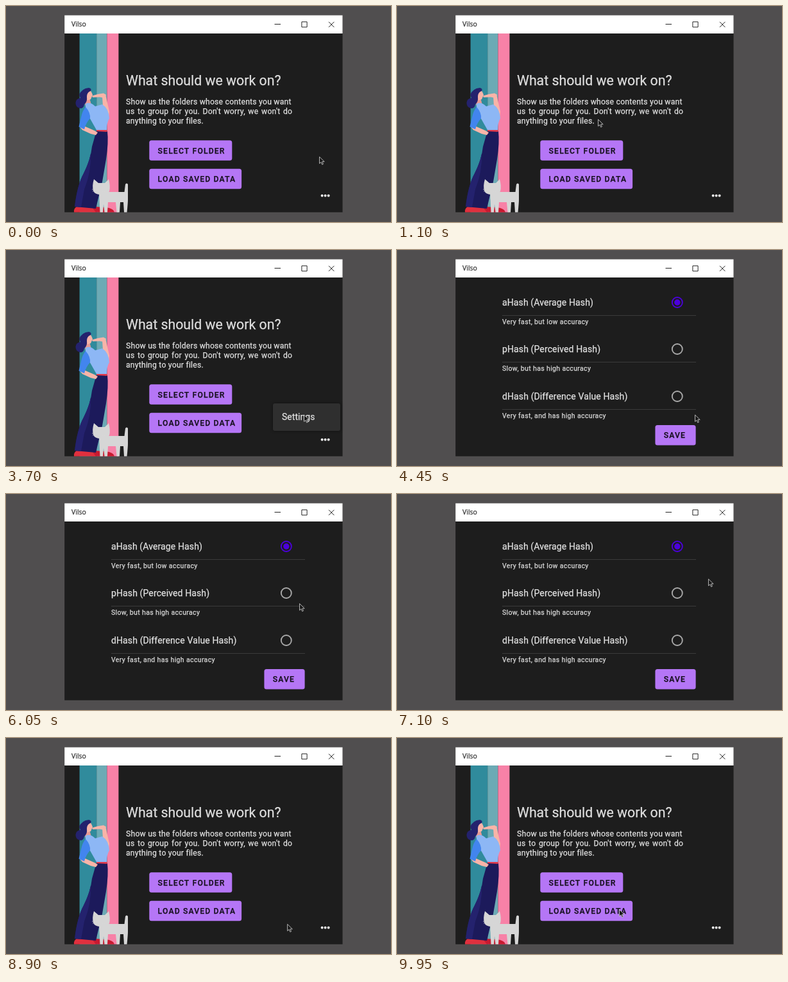
These frames come from a looping animation (600 by 338 pixels, 10000 ms). An HTML page with a canvas:

```html
<!DOCTYPE html>
<html lang="en">
<head>
<meta charset="utf-8">
<title>Folder grouping app</title>
<style>
  html, body { margin: 0; width: 100%; height: 100%; overflow: hidden; background: #504e4f; }
  canvas { display: block; width: 600px; height: 338px; }
</style>
</head>
<body>
<canvas id="stage" width="600" height="338"></canvas>
<script>
const ctx = document.getElementById('stage').getContext('2d');
const LOOP = 10000, STEP = 50;
const SANS = 'Roboto, sans-serif';
const PURPLE = '#b576f6', DARK = '#1d1d1d', SKIN = '#f8b4a8', CAT = '#d6d6d6';

// Pointer path: time, x, y
const PATH = [
  [0, 488, 235.5], [550, 403, 189], [650, 403, 189], [1100, 313, 177],
  [1900, 313, 177], [2700, 503, 292], [3450, 503, 292], [3600, 470, 266],
  [3650, 460, 256], [3700, 464, 257.5], [4450, 464, 257.5], [4650, 464, 267],
  [5150, 464, 267], [5300, 453, 215], [5400, 463, 177], [6000, 463, 177],
  [6050, 457, 171], [6500, 430, 77], [7050, 484, 126], [7250, 490, 168],
  [7600, 443, 289], [7700, 445, 291], [8850, 445, 291], [9150, 352, 289],
  [9850, 352, 289], [9950, 346, 268], [LOOP, 346, 268]
];

function rect(x, y, w, h, color, r = 0) {
  ctx.fillStyle = color;
  ctx.beginPath();
  ctx.roundRect(x, y, w, h, r);
  ctx.fill();
}

function shape(d, fill, stroke, width = 1) {
  const p = new Path2D(d);
  if (fill) { ctx.fillStyle = fill; ctx.fill(p); }
  if (stroke) { ctx.strokeStyle = stroke; ctx.lineWidth = width; ctx.stroke(p); }
}

function disc(x, y, r, color) {
  ctx.fillStyle = color;
  ctx.beginPath();
  ctx.arc(x, y, r, 0, Math.PI * 2);
  ctx.fill();
}

function ring(x, y, r, color, width) {
  ctx.strokeStyle = color;
  ctx.lineWidth = width;
  ctx.beginPath();
  ctx.arc(x, y, r, 0, Math.PI * 2);
  ctx.stroke();
}

// Text with a hairline outline for a slightly heavier weight
function text(str, x, y, font, color, spacing = 0, words = 0) {
  ctx.font = font;
  ctx.letterSpacing = spacing + 'px';
  ctx.wordSpacing = words + 'px';
  ctx.fillStyle = ctx.strokeStyle = color;
  ctx.lineWidth = .25;
  ctx.fillText(str, x, y);
  ctx.strokeText(str, x, y);
}

function button(label, x, y, w, h) {
  rect(x, y, w, h, PURPLE, 3.5);
  text(label, x + 13.3, y + 20.3, '500 12.2px ' + SANS, '#17101f', 1.14);
}

function frame() {
  rect(0, 0, 600, 338, '#504e4f');
  rect(91.2, 14.4, 433.3, 308.4, DARK);
  rect(91.2, 14.4, 433.3, 28.5, '#fff');
  text('Vilso', 102, 32, '10.5px "Open Sans", sans-serif', '#333');
  shape('M418.5 28.5H428', null, '#222');
  shape('M460.9 24.8h8.2v8.2h-8.2z', null, '#222');
  shape('M503 24.8l8.4 8.4M511.4 24.8l-8.4 8.4', null, '#222');
}

function woman() {
  // shoes and trousers
  shape('M136 314L156 315Q168 317 169 322.8H134Z', '#c81a30');
  shape('M106 322.8Q105 316 112 313L134 315L140 322.8Z', '#e0303e');
  shape('M141 195L158 196Q160 213 156 240L150 275L140 317L107 314Q111 280 121 262Q132 240 134 220Z', '#1c1a5b');
  shape('M121 262Q129 246 132 231Q133 260 122 287L117 315L107 314Q111 280 121 262Z', '#24226e');
  shape('M141 193L157.5 194V197L141 196Z', '#e0384a');
  // arm on hip, seen behind the open elbow
  shape('M114 188L122 188L138 195L143 198L140 202L132 200L119 194Z', SKIN);
  // raised forearm and hand
  shape('M150 141L155 138L161 165L160 176L152 174Z', SKIN);
  shape('M134 140.5L143 138L152 136.5L156 139L153 144L146 142.5L135 143Z', SKIN);
  // neck and face
  shape('M121 144L131 147L133 155L124 157Z', '#e99a94');
  shape('M123 136L131 131Q133 134 135 139L132 146Q129 148 124 147Z', SKIN);
  // hair
  shape('M114 139Q118 129 129 128Q134 129 132 133Q126 135 126 142Q127 150 122 154Q121 161 115 160Q108 158 108.5 151Q109 145 116 144Z', '#24226e');
  // shirt and sleeve, with a gap between arm and waist
  shape('M124 153Q131 149 139 157L150 154Q160 160 161 176Q157 182 157 194H141L132 178L124 165Z', '#8db7f5');
  shape('M124 158Q119 164 117 174L113.5 189L122 193Q125 182 131 176Q132 167 124 158Z', '#4285ee');
}

function cat() {
  shape('M137 271L144 277H154L160 271Q163 282 161 290Q158 295 148 295Q138 295 136 289Q134 281 137 271Z', CAT);
  shape('M145 292Q150 290 158 291H184.5L186 279Q188 276 190 279V303Q190 308 188.5 322.8H184L183 307H178L177 322.8H172.5L171 307H159L158 322.8H153.5L152 310L151 322.8H146.5Z', CAT);
  shape('M134 287H139M135 290L140 289', null, CAT, .7);
}

function home() {
  rect(114.6, 42.9, 26.6, 279.9, '#308b9c');
  rect(141.2, 42.9, 16.2, 279.9, '#6caab5');
  rect(157.4, 42.9, 18, 279.9, '#f781a7');
  woman();
  cat();
  text('What should we work on?', 187, 124, '21.3px ' + SANS, '#dedede');
  const body = '12.2px ' + SANS;
  text('Show us the folders whose contents you want', 187, 153.5, body, '#e2e2e2', .22);
  text("us to group for you. Don't worry, we won't do", 187, 168.6, body, '#e2e2e2', .22, 1.35);
  text('anything to your files.', 187, 183.7, body, '#e2e2e2', .22);
  button('SELECT FOLDER', 223.3, 210.3, 129, 31.5);
  button('LOAD SAVED DATA', 223.3, 254.8, 143.8, 31.5);
  for (let i = 0; i < 3; i++) disc(492.6 + i * 5, 296.8, 2, '#f0f0f0');
}

function menu() {
  ctx.save();
  ctx.shadowColor = 'rgba(0,0,0,.5)';
  ctx.shadowBlur = 4;
  rect(416, 240, 105, 43, '#2f2f2f', 3);
  ctx.restore();
  text('Settings', 430, 266, '13.9px ' + SANS, '#e2e2e2', .1);
}

function option(title, note, y, on) {
  text(title, 164, y + 5, '14px ' + SANS, '#e2e2e2', .12);
  rect(164, y + 20, 302, 1, '#3b3b3b');
  text(note, 164, y + 34, '10.5px ' + SANS, '#dcdcdc', .36);
  const color = on ? '#4b00dc' : '#a8a8a8';
  ring(436.8, y, 8, color, 1.9);
  if (on) disc(436.8, y, 4.7, color);
}

function settings() {
  option('aHash (Average Hash)', 'Very fast, but low accuracy', 82, true);
  option('pHash (Perceived Hash)', 'Slow, but has high accuracy', 155, false);
  option('dHash (Difference Value Hash)', 'Very fast, and has high accuracy', 229, false);
  button('SAVE', 402.4, 274, 63.2, 31.6);
}

function pointerAt(t) {
  const i = PATH.findIndex((p, n) => n > 0 && t <= p[0]);
  const [t0, x0, y0] = PATH[i - 1], [t1, x1, y1] = PATH[i];
  const k = (t - t0) / (t1 - t0), e = k * k * (3 - 2 * k);
  return [x0 + (x1 - x0) * e, y0 + (y1 - y0) * e];
}

function pointer(x, y, hand) {
  ctx.save();
  ctx.translate(x, y);
  ctx.lineJoin = 'round';
  if (hand) {
    shape('M3 9V2Q3 .6 4.2 .6T5.4 2V5.4Q6.6 4.7 7.4 5.8Q8.6 5.2 9.2 6.3Q10.8 6 11 7.8V11Q10.6 14.8 7.4 15Q4.4 15 3.4 12.8L.8 9.6Q.4 8.2 1.6 8Z', '#151515', '#c4c4c4', .9);
    shape('M5.4 5.4V8M7.4 5.8V8M9.2 6.3V8.2', null, '#a8a8a8', .6);
  } else {
    shape('M.5 .5V11L3 8.8L4.7 12.6L6.4 11.8L4.8 8.1H8.2Z', '#191919', '#c4c4c4', .9);
  }
  ctx.restore();
}

function draw(now) {
  const t = Math.floor(now % LOOP / STEP) * STEP;
  const inSettings = t >= 4450 && t < 8900;
  frame();
  if (inSettings) settings(); else home();
  if (t >= 3150 && t < 4450) menu();
  const [x, y] = pointerAt(t);
  const overDots = !inSettings && x > 484 && y > 284;
  const overSave = inSettings && x > 402 && x < 465 && y > 274;
  pointer(x, y, overDots || overSave);
}

let start = null;
function tick(now) {
  if (start === null) start = now;
  draw(now - start);
  requestAnimationFrame(tick);
}
draw(0);
requestAnimationFrame(tick);
</script>
</body>
</html>
```
